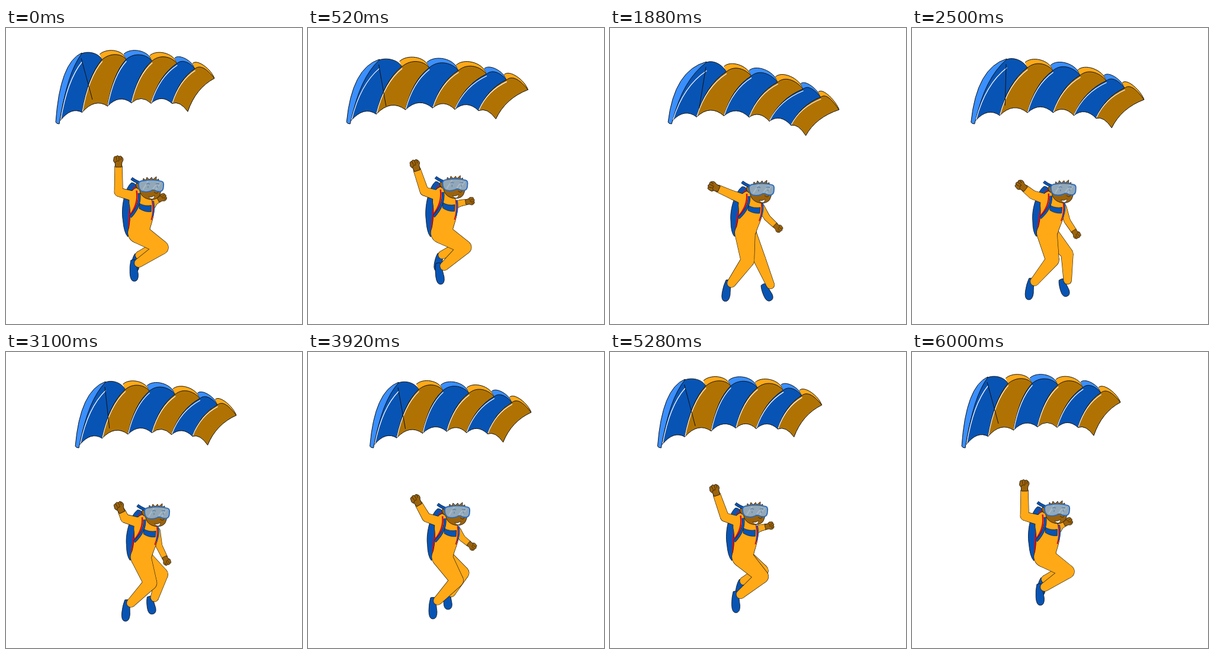
Animation, 500 px wide and 500 px high, one loop 6.02 s. Source, as an HTML page with a canvas:

```html
<!DOCTYPE html>
<html lang="en">
<head>
<meta charset="utf-8">
<title>Skydiver</title>
<style>
html, body { margin: 0; width: 100%; height: 100%; overflow: hidden; background: #fff; }
canvas { display: block; width: 500px; height: 500px; }
</style>
</head>
<body>
<canvas id="stage" width="500" height="500"></canvas>
<script>
const ctx = document.getElementById('stage').getContext('2d');
const LOOP = 6020, END = 6000;
const INK = '#111', ORANGE = '#ffa917', BROWN = '#b07303', BLUE = '#0854b4',
  SKY = '#3a8fff', SKIN = '#9c630c', RED = '#cc1020';

// Smooth looping track that never overshoots; each key is [time, ...values]
function track(keys) {
  const n = keys.length;
  const time = i => keys[(i + n) % n][0] + Math.floor(i / n) * END;
  const val = (i, c) => keys[(i + n) % n][c];
  const secant = (i, c) => (val(i + 1, c) - val(i, c)) / (time(i + 1) - time(i));
  const slope = (i, c) => {
    const a = secant(i - 1, c), b = secant(i, c);
    return a * b > 0 ? 2 * a * b / (a + b) : 0;
  };
  return t => {
    let i = n - 1;
    while (keys[i][0] > t) i--;
    const h = time(i + 1) - time(i), u = (t - time(i)) / h, v = 1 - u;
    return keys[0].slice(1).map((_, k) => {
      const c = k + 1;
      return v * v * (1 + 2 * u) * val(i, c) + u * u * (1 + 2 * v) * val(i + 1, c) +
        h * u * v * (v * slope(i, c) - u * slope(i + 1, c));
    });
  };
}

// Canopy apex x and y, span, drop
const canopyAt = track([
  [0, 128, 43, 224, 42],
  [620, 120, 55, 253, 51],
  [1040, 131, 56, 249, 51],
  [1880, 163, 58, 224, 80],
  [2500, 160, 53, 232, 68],
  [3100, 168, 51, 221, 56],
  [3920, 153, 52, 224, 50],
  [4600, 131, 55, 227, 46],
  [5580, 126, 44, 232, 42]
]);
// Goggles, near hand, far hand, near ankle, far ankle
const bodyAt = track([
  [0, 245, 267, 190, 225, 264, 287, 224, 397, 225, 384],
  [1040, 253, 264, 173, 244, 284, 305, 235, 412, 231, 383],
  [1880, 256, 273, 175, 268, 284, 338, 205, 431, 271, 434],
  [3100, 255, 272, 192, 262, 271, 353, 211, 424, 251, 415],
  [3920, 252, 270, 183, 250, 277, 328, 219, 420, 242, 407],
  [4600, 245, 270, 166, 244, 276, 307, 219, 421, 228, 392]
]);

// Canopy joints as parts of the span (u) and of the leading edge (v)
const RIDGE = [[0, 0], [.158, .034], [.329, -.034], [.517, -.08], [.7, -.112], [.84, -.084], [1, 0]];
const HEM = [[0, 1], [.136, .83], [.303, .675], [.465, .566], [.606, .52], [.756, .467], [.886, .54]];

function shape(fill, line, width, draw) {
  ctx.beginPath();
  draw();
  if (fill) { ctx.fillStyle = fill; ctx.fill(); }
  if (line) { ctx.strokeStyle = line; ctx.lineWidth = width; ctx.stroke(); }
}
const svg = (d, fill, line, width) => {
  const p = new Path2D(d);
  if (fill) { ctx.fillStyle = fill; ctx.fill(p); }
  if (line) { ctx.strokeStyle = line; ctx.lineWidth = width; ctx.stroke(p); }
};
const bend = (a, b, p, q) =>
  ctx.quadraticCurveTo(a[0] + p * (b[0] - a[0]), a[1] + q * (b[1] - a[1]), ...b);

function canopy(t) {
  const [ax, ay, span, drop] = canopyAt(t);
  // The leading edge swings back as the canopy tips forward
  const back = -36 - .55 * (drop - 42) - .25 * (span - 224);
  const place = ([u, v]) => [ax + u * span + v * back, ay + u * drop + v * (156 - ay)];
  const top = RIDGE.map(place), low = HEM.map(place), [x, y] = low[0];
  const tip = [x - 8, y + 3];

  shape(SKY, INK, 1, () => {
    ctx.moveTo(x - 2, y + 6);
    ctx.quadraticCurveTo(x - 7, y + 6, ...tip);
    bend(tip, [ax, ay - 1], .16, .86);
    ctx.lineTo(ax - 1, ay + 8);
    bend([ax - 1, ay + 8], [x - 2, y + 6], .7, .32);
  });
  for (let i = 1; i < 6; i++) {
    const a = top[i], b = top[i + 1], d = b[0] - a[0], sx = a[0] - 4, sy = a[1] - 9;
    shape(i % 2 ? ORANGE : SKY, INK, 1, () => {
      ctx.moveTo(sx, sy);
      ctx.bezierCurveTo(sx + d * .25, sy - d * .25, b[0] - d * .15, b[1] - d * .45, ...b);
      ctx.lineTo(...a);
    });
  }
  for (let i = 0; i < 6; i++) {
    const a = top[i], b = top[i + 1], l = low[i], r = low[i + 1], d = b[0] - a[0];
    shape(i % 2 ? BROWN : BLUE, INK, 1, () => {
      ctx.moveTo(...l);
      bend(l, a, .3, .7);
      if (i) ctx.bezierCurveTo(a[0] + d * .35, a[1] - d * .3, b[0] - d * .2, b[1] - d * .25, ...b);
      else ctx.bezierCurveTo(a[0] + d * .4, a[1] - 5, b[0] - 5, b[1] - 10, ...b);
      bend(b, r, .7, .3);
      ctx.quadraticCurveTo((l[0] + r[0]) / 2, (l[1] + r[1]) / 2 - .45 * (r[0] - l[0]), ...l);
    });
  }
  for (let i = 0; i < 6; i++) {
    const a = [top[i][0] + .5, top[i][1] + (i ? 3 : 14)], l = [low[i][0] + .5, low[i][1] - 1];
    shape(null, '#fff', 1.2, () => { ctx.moveTo(...l); bend(l, a, .3, .68); });
  }
  shape(null, INK, 1, () => {
    ctx.moveTo(ax - 1, ay + 8);
    ctx.lineTo(ax + 18 - .8 * (drop - 42), ay + 78);
  });
}

// Tapered limb through joints [x, y, r], grown by g
function limb(joints, color, g) {
  joints.forEach(([x, y, r], i) => {
    shape(color, null, 0, () => ctx.arc(x, y, r + g, 0, 7));
    if (!i) return;
    const [px, py, pr] = joints[i - 1], d = Math.hypot(x - px, y - py) || 1;
    const way = Math.atan2(y - py, x - px);
    const lean = Math.acos(Math.max(-1, Math.min(1, (pr - r) / d)));
    const rim = (cx, cy, cr, s) =>
      [cx + (cr + g) * Math.cos(way + s * lean), cy + (cr + g) * Math.sin(way + s * lean)];
    shape(color, null, 0, () => {
      ctx.moveTo(...rim(px, py, pr, 1));
      ctx.lineTo(...rim(x, y, r, 1));
      ctx.lineTo(...rim(x, y, r, -1));
      ctx.lineTo(...rim(px, py, pr, -1));
    });
  });
}
const outlined = joints => { limb(joints, INK, .6); limb(joints, ORANGE, 0); };

function local(x, y, turn, draw) {
  ctx.save();
  ctx.translate(x, y);
  ctx.rotate(turn);
  draw();
  ctx.restore();
}

// Feet hang from the ankle and tilt as it swings away from rest
const foot = ([x, y], dx, rest, lag, half) => local(x + dx, y + 13, (rest - x) * lag, () =>
  svg(`M-4 ${-half}Q1 ${-half - 2} 6 ${-half + 1}Q5 -4 7 6Q7 ${half} 0 ${half}Q-7 ${half} -7 4Q-7 -8 -4 ${-half}Z`, BLUE, INK, .8));

const fist = (from, to, size) =>
  local(...to, Math.atan2(to[1] - from[1], to[0] - from[0]), () => {
    ctx.scale(size, size);
    svg('M-10 -5L-3 -6Q0 -10 4 -8Q9 -8 8 -4Q11 -2 8 1Q10 4 7 6Q3 10 -2 6L-10 5Z', SKIN, INK, .8);
    svg('M8 -4L2 -3M8 1L1 1M7 5L2 4M-3 -6Q2 -4 0 1', null, '#4a2d02', 1);
  });

function head(x, y) {
  local(x, y, 0, () => {
    svg('M-17 -4L-14 -9L-13 -13L-9 -10L-7 -15L-3 -11L1 -15L3 -11L9 -16L9 -10L13 -12L13 -5Z', SKIN, INK, .7);
    svg('M-19 -5C-21 8 -18 17 -8 21C2 25 13 22 15 14Q18 8 17 -4Q0 -12 -19 -5Z', SKIN, INK, .8);
    svg('M-18 -3Q-25 -8 -26 -2Q-25 5 -18 5Z', SKIN, INK, .7);
    svg('M-4 18Q1 20 6 16Q6 21 2 22Q-2 22 -4 18Z', '#fff', INK, .6);
    svg('M5 10Q11 15 12 9', null, '#4a2d02', 1);
    svg('M-33 -13Q-27 -8 -18 -5', null, INK, 5);
    svg('M-33 -13Q-27 -8 -18 -5', null, BLUE, 4);
    svg('M-21 -4Q-20 -9 -13 -9Q3 -12 18 -8Q22 -7 21 0Q21 8 16 9Q10 10 6 7Q3 6 0 8Q-7 11 -15 9Q-21 7 -21 -4Z', '#92a8b8', '#2869bd', 1.8);
    svg('M-14 6L-5 -8M3 5L12 -7M8 6L16 -5', null, '#a9bac6', 2);
    svg('M-8 -3Q-5 -6 -2 -3M8 -3Q11 -6 14 -3M-5 0v3M11 0v3', null, '#587da6', 1.2);
  });
}

// The knee moves forward as the ankle comes nearer to the hip
function knee([hx, hy], [x, y], depth) {
  const dx = x - hx, dy = y - hy, d = Math.hypot(dx, dy);
  const out = depth * Math.sqrt(Math.max(0, 47 ** 2 - d * d / 4)) / d;
  return [hx + dx / 2 + dy * out, hy + dy / 2 - dx * out];
}
// Point a gap short of b, on the way from a
function before(a, b, gap) {
  const d = Math.hypot(b[0] - a[0], b[1] - a[1]) || 1, s = Math.max(0, d - gap) / d;
  return [a[0] + (b[0] - a[0]) * s, a[1] + (b[1] - a[1]) * s];
}

function diver(t) {
  const p = bodyAt(t);
  const [gaze, hand, farHand, ankle, farAnkle] = [0, 2, 4, 6, 8].map(i => p.slice(i, i + 2));
  // The trunk shears: hips follow the head by less than half
  const dx = .45 * (gaze[0] - 256), kx = (gaze[0] - 256 - dx) / 72, ky = (gaze[1] - 273) / 72;
  const at = (x, y) => [x + dx + kx * (345 - y), y + ky * (345 - y)];
  const onTrunk = draw => {
    ctx.save();
    ctx.transform(1, 0, -kx, 1 - ky, dx + kx * 345, ky * 345);
    draw();
    ctx.restore();
  };
  const shoulder = at(222, 288), farShoulder = at(255, 303), hip = at(228, 346), farHip = at(234, 347);
  // The elbow sticks out as the hand comes closer
  const elbow = [shoulder[0] - 28 - .27 * (hand[0] - shoulder[0]), shoulder[1] - 6];
  const farElbow = [(farShoulder[0] + farHand[0]) / 2 - 4, (farShoulder[1] + farHand[1]) / 2];

  onTrunk(() => {
    svg('M223 268C212 276 202 305 204 326Q204 345 210 352L216 346L232 274Q229 267 223 268Z', BLUE, INK, .8);
    svg('M228 273Q215 305 212 348', null, RED, 2.5);
  });

  outlined([[...farShoulder, 6], [...farElbow, 5], [...before(farElbow, farHand, 7), 4.5]]);
  fist(farElbow, farHand, .8);

  foot(farAnkle, -6, 238, .013, 15);
  outlined([[...farHip, 13], [...knee(farHip, farAnkle, .7), 10], [...farAnkle, 6.5]]);
  foot(ankle, -8, 219, .012, 18);

  const leg = [[...hip, 17], [...knee(hip, ankle, 1), 11], [...ankle, 7]];
  const arm = [[...shoulder, 8], [...elbow, 7], [...before(elbow, hand, 9), 6]];
  const torso = 'M231 276Q218 280 217 300Q220 318 211 347L246 347C250 332 258 322 258 303Q256 292 248 288Z';
  for (const [color, grow] of [[INK, .6], [ORANGE, 0]]) {
    limb(leg, color, grow);
    limb(arm, color, grow);
    onTrunk(() => svg(torso, color, grow && color, 1.2));
  }
  onTrunk(() => {
    svg('M231 280Q233 301 216 319', null, RED, 2.5);
    svg('M235 284Q236 304 217 321', null, INK, 4.4);
    svg('M235 284Q236 304 217 321', null, BLUE, 3.4);
    svg('M234 300Q243 305 254 303L253 313Q242 314 233 308Z', BLUE, INK, .6);
    svg('M256 296Q258 312 252 326', null, RED, 2);
    svg('M258 296Q260 308 255 320', null, BLUE, 2);
  });
  head(...gaze);
  fist(elbow, hand, 1);
}

ctx.lineJoin = 'round';
const start = performance.now();
function frame() {
  const t = Math.min((performance.now() - start) % LOOP, END - .01);
  ctx.fillStyle = '#fff';
  ctx.fillRect(0, 0, 500, 500);
  canopy(t);
  diver(t);
  requestAnimationFrame(frame);
}
frame();
</script>
</body>
</html>
```
